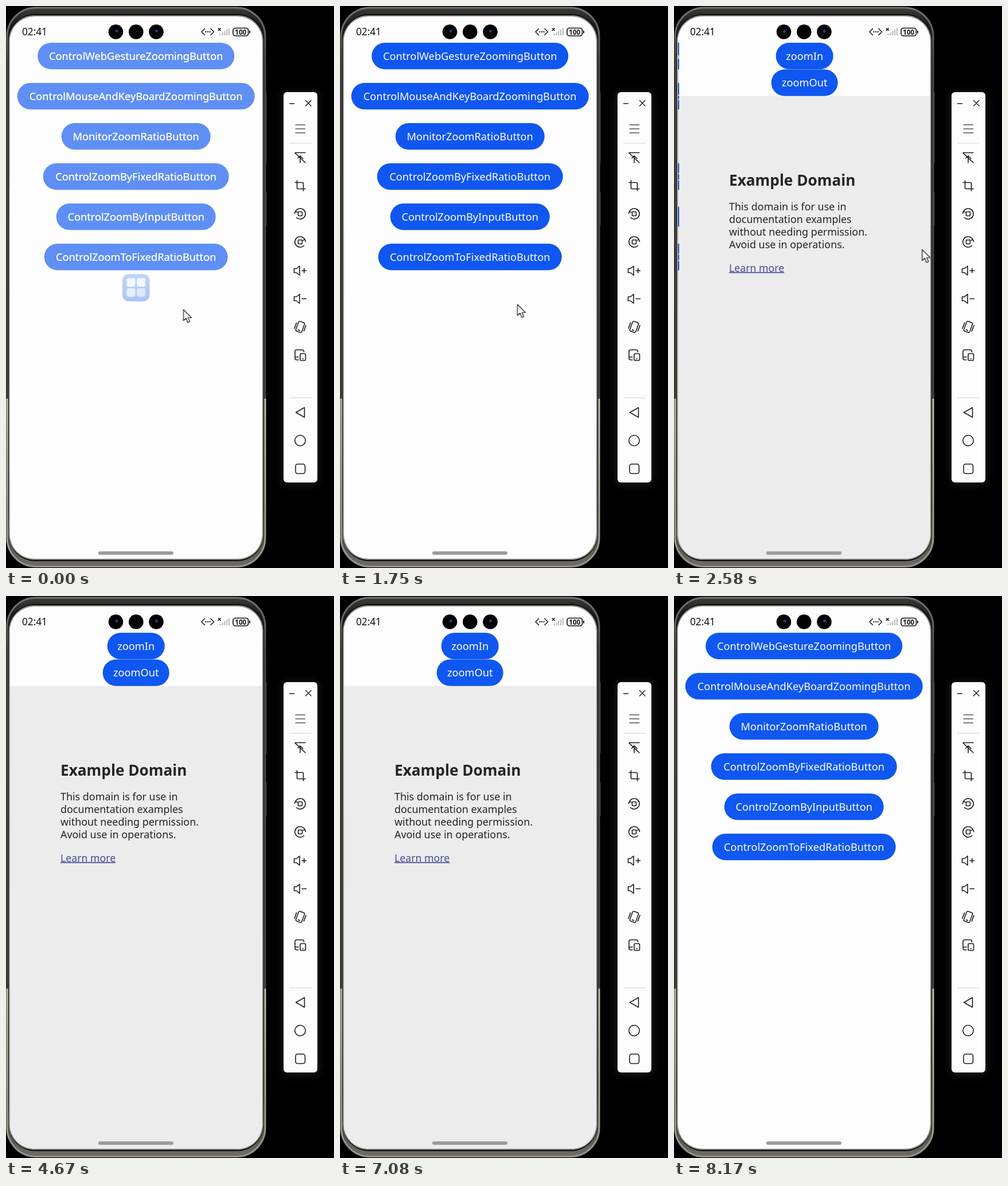
Animation, 572 px wide and 979 px high, one loop 8250 ms. Source, as an HTML page:

```html
<!DOCTYPE html>
<html lang="en">
<head>
<meta charset="utf-8">
<title>Zoom demo</title>
<style>
@property --p { syntax: '<number>'; inherits: true; initial-value: 0; }
html, body { margin: 0; width: 100%; height: 100%; overflow: hidden; background: #000; }
svg { display: block; width: 572px; height: 979px; font-family: 'Noto Sans', 'Open Sans', sans-serif; }

/* --p is how far the second page has been pushed in; the easing is a critically damped spring */
#screen { animation: nav 8.25s infinite linear(0, .079 5%, .237 10%, .404 15%, .552 20%, .765 30%, .884 40%, .945 50%, .975 60%, .989 70%, .995 80%, 1); }
#home { transform: translateX(calc(var(--p) * -88px)); }
#shade { opacity: calc(var(--p) * .08); }
#edge { transform: translateX(calc((1 - var(--p)) * 440px)); }
#page { transform: translateX(calc((1 - var(--p)) * -220px)); }
#zoom { transform-origin: 71px 283px; animation: zoom 8.25s infinite ease-out; }
#splash { animation: splash 8.25s infinite linear; }
#cursor { animation: cursor 8.25s infinite ease-in-out; }

@keyframes nav {
  0%, 26.3% { --p: 0; }
  32.36%, 91.33% { --p: 1; }
  97.39%, 100% { --p: 0; }
}
@keyframes zoom {
  0%, 63.6% { transform: scale(1); }
  65.4%, 81.8% { transform: scale(1.25); }
  83.6%, 100% { transform: scale(1); }
}
@keyframes splash {
  0%, .97% { opacity: 1; }
  2.1%, 100% { opacity: 0; }
}
@keyframes cursor {
  0%, 2% { transform: translate(309.5px, 529px); opacity: 1; }
  4%, 21.3% { transform: translate(309.5px, 520px); opacity: 1; }
  25%, 26.5% { transform: translate(300px, 303px); opacity: 1; }
  31.27% { transform: translate(432px, 424.5px); opacity: 1; animation-timing-function: linear; }
  34% { transform: translate(560px, 400px); opacity: 1; animation-timing-function: step-start; }
  34.1%, 99.99% { transform: translate(560px, 400px); opacity: 0; }
  100% { transform: translate(309.5px, 529px); opacity: 0; }
}

.btn rect { fill: #0f57f0; }
.btn text { fill: #fff; font-size: 18.2px; font-weight: 500; text-anchor: middle; }
.web { fill: #242427; font-size: 17.9px; }
.web .h { font-size: 26.2px; font-weight: 700; }
.web .a { fill: #454f96; font-size: 17.7px; }
.line { fill: none; stroke: #1c1c1e; stroke-width: 1.6; stroke-linecap: round; stroke-linejoin: round; }
</style>
</head>
<body>
<svg viewBox="0 0 572 979">
  <defs>
    <linearGradient id="rim" x2="0" y2="1">
      <stop offset="0" stop-color="#75736d"/>
      <stop offset=".1" stop-color="#4c4b47"/>
      <stop offset=".699" stop-color="#45443f"/>
      <stop offset=".7" stop-color="#c2beb1"/>
      <stop offset="1" stop-color="#969287"/>
    </linearGradient>
    <linearGradient id="band" x2="0" y2="1">
      <stop offset="0" stop-color="#3c3b38"/>
      <stop offset=".03" stop-color="#1d1c1b"/>
      <stop offset=".9" stop-color="#2b2a28"/>
      <stop offset="1" stop-color="#6f6d66"/>
    </linearGradient>
    <linearGradient id="tile" x2="0" y2="1">
      <stop offset="0" stop-color="#bfd6fa"/>
      <stop offset="1" stop-color="#a9c5f4"/>
    </linearGradient>
    <clipPath id="glass"><rect x="6.5" y="18" width="440.5" height="945" rx="43"/></clipPath>
    <clipPath id="sheet"><rect x="7" y="64" width="441" height="900"/></clipPath>
    <filter id="blur" x="-50%" y="-10%" width="200%" height="120%"><feGaussianBlur stdDeviation="8"/></filter>
  </defs>

  <rect width="572" height="979"/>

  <!-- phone body -->
  <path d="M454 150V274M454 325V383" stroke="#3a3935" stroke-width="1.5"/>
  <rect x="2" y="3" width="450" height="973.5" rx="50" fill="url(#band)" stroke="url(#rim)" stroke-width="3"/>
  <rect x="5" y="14" width="444" height="953" rx="46" fill="#0a0a0a"/>
  <rect x="5.8" y="17" width="442" height="947" rx="44" fill="#000" stroke="#a3a29e" stroke-width="1.4"/>

  <g id="screen" clip-path="url(#glass)">
    <rect x="6" y="18" width="442" height="946" fill="#fdfdfd"/>
    <g clip-path="url(#sheet)">
      <g id="home" class="btn"></g>
      <rect id="shade" x="6" y="64" width="442" height="866"/>
    </g>
    <g id="edge" clip-path="url(#sheet)">
      <g id="page">
        <rect x="7" y="64" width="660" height="93" fill="#fdfdfd"/>
        <rect x="7" y="157" width="660" height="807" fill="#ececec"/>
        <g id="zoom" class="web">
          <text class="h" x="95" y="312.7">Example Domain</text>
          <text x="95" y="356">This domain is for use in</text>
          <text x="95" y="378">documentation examples</text>
          <text x="95" y="400">without needing permission.</text>
          <text x="95" y="422">Avoid use in operations.</text>
          <text class="a" x="95" y="462.5" text-decoration="underline">Learn more</text>
        </g>
        <g id="actions" class="btn"></g>
      </g>
    </g>

    <g id="splash">
      <rect x="6" y="60" width="442" height="904" fill="#fdfdfd" opacity=".34"/>
      <g class="btn" id="labels"></g>
      <rect x="203" y="467" width="47.5" height="47.5" rx="11" fill="url(#tile)"/>
      <g fill="#f3f7fe">
        <rect x="210.5" y="474" width="15" height="15" rx="3.5"/>
        <rect x="228" y="474" width="15" height="15" rx="3.5"/>
        <rect x="210.5" y="491.5" width="15" height="15" rx="3.5" opacity=".8"/>
        <rect x="228" y="491.5" width="15" height="15" rx="3.5" opacity=".65"/>
      </g>
    </g>

    <!-- status bar -->
    <text x="28" y="51" font-size="17.2" font-weight="500" fill="#111">02:41</text>
    <circle cx="191.5" cy="45" r="12.8"/>
    <circle cx="226.8" cy="45" r="12.8"/>
    <circle cx="262" cy="45" r="12.8"/>
    <g fill="#1d3b78">
      <circle cx="193" cy="43.5" r="2.6"/>
      <circle cx="262.5" cy="43.5" r="2.6"/>
    </g>
    <path class="line" d="M346.5 39.5L341 45l5.500 5.500M357 39.500l5.500 5.500-5.500 5.500" stroke-width="1.9"/>
    <path class="line" d="M348.500 45h.1M352 45h.1M355.500 45h.1" style="stroke-width:2.3"/>
    <path d="M370 38.500l4.500 4.500M374.500 38.500l-4.500 4.500" stroke="#111" stroke-width="1.700"/>
    <path d="M373.500 51v-3M377.500 51v-5M381.300 51v-7.500M385.100 51v-10M388.900 51v-12.500" stroke="#b9b9b9" stroke-width="2"/>
    <rect x="396" y="38.500" width="26.500" height="13.500" rx="4" fill="none" stroke="#111" stroke-width="1.700"/>
    <path d="M425 43v4.500" stroke="#111" stroke-width="1.800"/>
    <text x="409.200" y="49.500" font-size="11.500" font-weight="700" text-anchor="middle" fill="#111">100</text>

    <rect x="161" y="950" width="131" height="6" rx="3" fill="#9c9c9e"/>
  </g>

  <!-- emulator toolbar -->
  <rect x="482" y="150" width="63" height="684" rx="8" fill="#fff" opacity=".1" filter="url(#blur)"/>
  <rect x="484" y="150" width="59" height="680" rx="6" fill="#fdfdfd"/>
  <path d="M494 239H533M494 682.500H533" stroke="#d4d4d8"/>
  <g class="line">
    <path d="M494.500 170h8M522.500 164.500l9.500 9.500M532 164.500l-9.500 9.500" stroke-width="1.400"/>
    <path d="M505 207h16.500M505 214h16.500M505 221h16.500" stroke="#55555c"/>
    <g transform="translate(513 264)">
      <path d="M-8.500-8.500H9M0-3V9M-4 1L0-3 5 2M-9-8L9 9"/>
    </g>
    <g transform="translate(513 313)">
      <path d="M-5.500-9V3.500Q-5.500 5.500-3.500 5.500H9M-9-5.500H3.500Q5.500-5.500 5.500-3.500V9"/>
    </g>
    <g id="turn" transform="translate(513 362)">
      <path d="M-8.500-3.500A9.200 9.200 0 1 1-6.500 6.500M-9.500-.500l1-3.500 3.500 1"/>
      <rect x="-3.500" y="-3.500" width="7" height="7" rx="1.500"/>
    </g>
    <use href="#turn" transform="translate(1026 49) scale(-1 1)"/>
    <g id="horn" transform="translate(513 461)">
      <path d="M-10.500-3.500h4l5.500-4.500V8l-5.500-4.500h-4Z"/>
      <path d="M3 0H10.500"/>
    </g>
    <use href="#horn" y="49"/>
    <path d="M519.800 457.200v7.600"/>
    <g transform="translate(513 559) rotate(20)">
      <rect x="-5.500" y="-9" width="11" height="18" rx="2.500"/>
      <path d="M-1.500 6h3M-8.500-4.500V6M8.500-6V4.500"/>
    </g>
    <g transform="translate(513 608)">
      <path d="M-3 8.500H-6Q-9 8.500-9 5.500V-6Q-9-9-6-9H3.500Q6.500-9 6.500-6V-5.500M-9 3.500H-3"/>
      <rect x="0" y="-2.500" width="9.500" height="12" rx="2"/>
      <path d="M4 6.500h1.500"/>
    </g>
    <path d="M505.500 708L520.500 699.500V716.500Z"/>
    <circle cx="513" cy="757" r="9.200"/>
    <rect x="505" y="798" width="16.500" height="16.500" rx="3.500"/>
  </g>

  <path id="cursor" d="M0 0V19L4.600 15 7.600 22.500 11 21 8 14H14Z" fill="#fff" stroke="#111" stroke-width="1.200" stroke-linejoin="round"/>
</svg>
<script>
const home = [
  ['ControlWebGestureZoomingButton', 343],
  ['ControlMouseAndKeyBoardZoomingButton', 414],
  ['MonitorZoomRatioButton', 260],
  ['ControlZoomByFixedRatioButton', 324],
  ['ControlZoomByInputButton', 278],
  ['ControlZoomToFixedRatioButton', 320]
];
const actions = [['zoomIn', 100], ['zoomOut', 116]];
const mid = 226.7;

const pill = (w, y) => `<rect x="${mid - w / 2}" y="${y}" width="${w}" height="46.3" rx="23"/>`;
const label = (s, y) => `<text x="${mid}" y="${y + 29.5}">${s}</text>`;
const fill = (id, list, step, draw) => {
  document.getElementById(id).innerHTML =
    list.map(([s, w], i) => draw(s, w, 64 + i * step)).join('');
};

fill('home', home, 70, (s, w, y) => pill(w, y) + label(s, y));
fill('actions', actions, 46.5, (s, w, y) => pill(w, y) + label(s, y));
// keeps the captions crisp above the splash veil
fill('labels', home, 70, (s, w, y) => label(s, y));
</script>
</body>
</html>
```
